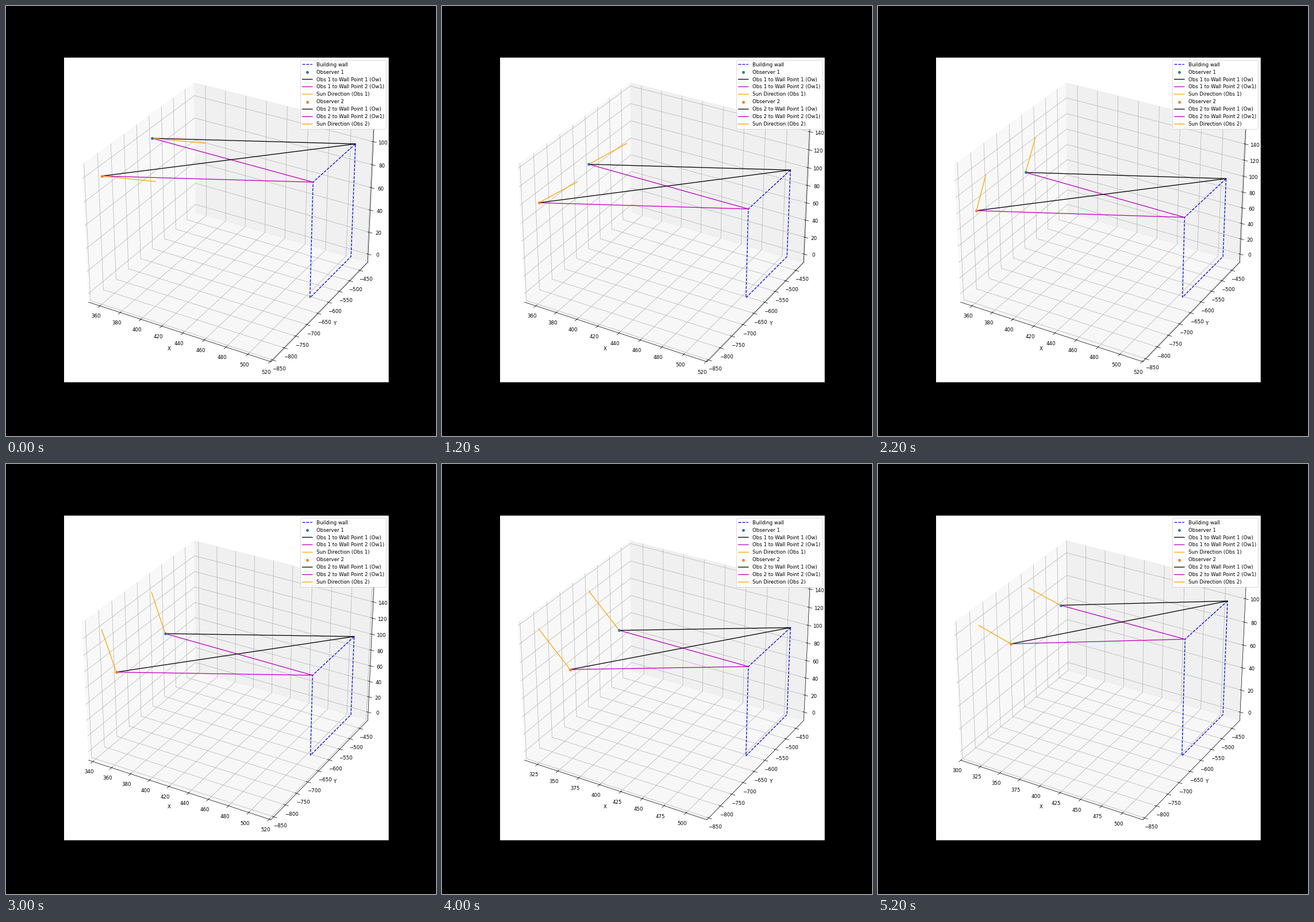
Write a matplotlib script that moves like this. It is 748 px wide and 748 px high and loops after 5.3 s.

```python
import numpy as np
import matplotlib.pyplot as plt
from matplotlib.animation import FuncAnimation
from matplotlib.ticker import MultipleLocator

SIZE_PX, SIZE_IN = 748, 12
FRAMES, INTERVAL = 53, 100

WALL_X, OBSERVER_X = 509.8, 359.8
Y_NEAR, Y_MID, Y_FAR = -829, -634, -439
HEIGHT = 100
OBSERVERS = [(OBSERVER_X, Y_MID, HEIGHT), (OBSERVER_X, Y_NEAR, HEIGHT)]
WALL_TOP = [(WALL_X, Y_FAR, HEIGHT), (WALL_X, Y_MID, HEIGHT)]
WALL_BASE = [(WALL_X, Y_MID, 0), (WALL_X, Y_FAR, 0)]

SUN_LENGTH = 50
LATITUDE, DECLINATION = np.radians([28, 22])
NOON = 25.85                 # step at which the sun is highest
STEP_ANGLE = np.radians(3.75)  # a quarter of an hour


def sun_vector(step):
    """East, north and up parts of the sun direction."""
    hour = (step - NOON) * STEP_ANGLE
    sin_lat, cos_lat = np.sin(LATITUDE), np.cos(LATITUDE)
    sin_dec, cos_dec = np.sin(DECLINATION), np.cos(DECLINATION)
    east = -cos_dec * np.sin(hour)
    north = sin_dec * cos_lat - cos_dec * sin_lat * np.cos(hour)
    up = sin_lat * sin_dec + cos_lat * cos_dec * np.cos(hour)
    return SUN_LENGTH * np.array([east, north, up])


def padded(low, high):
    """Data margin of 5 %, then a view margin of 1/48."""
    for part in (1 / 20, 1 / 48):
        pad = (high - low) * part
        low, high = low - pad, high + pad
    return low, high


def columns(*points):
    return np.array(points, dtype=float).T


fig = plt.figure(figsize=(SIZE_IN, SIZE_IN), dpi=SIZE_PX / SIZE_IN,
                 facecolor="black")
ax = fig.add_axes([0.135, 0.125, 0.755, 0.755], projection="3d")
ax.patch.set_snap(False)
ax.set_xlabel("X")
ax.set_ylabel("Y")
ax.yaxis.set_major_locator(MultipleLocator(50))
ax.zaxis.set_major_locator(MultipleLocator(20))
for axis, grey in ((ax.xaxis, 0.95), (ax.yaxis, 0.89), (ax.zaxis, 0.94)):
    axis.set_pane_color((grey, grey, grey, 0.5))

ax.plot(*columns(*WALL_TOP, *WALL_BASE, WALL_TOP[0]), "b--",
        label="Building wall")

sun_lines = []
for i, obs in enumerate(OBSERVERS, 1):
    ax.scatter(*obs, label=f"Observer {i}")
    for j, (top, color, tag) in enumerate(zip(WALL_TOP, "km", ("Ow", "Ow1")), 1):
        ax.plot(*columns(obs, top), color=color,
                label=f"Obs {i} to Wall Point {j} ({tag})")
    sun_lines += ax.plot(*columns(obs, obs), color="orange",
                         label=f"Sun Direction (Obs {i})")

legend = ax.legend(loc="upper right", labelspacing=0.46)
for handle in legend.legend_handles:
    handle.set_snap(False)


def update(step):
    ends = np.array(OBSERVERS) + sun_vector(step)
    for line, obs, end in zip(sun_lines, OBSERVERS, ends):
        line.set_data_3d(*columns(obs, end))

    points = np.vstack([OBSERVERS, ends, WALL_TOP, WALL_BASE])
    low, high = points.min(axis=0), points.max(axis=0)
    x_span = 1.1 * (high[0] - low[0])
    ax.xaxis.set_major_locator(MultipleLocator(20 if x_span <= 180 else 25))
    ax.set_xlim(*padded(low[0], high[0]))
    ax.set_ylim(*padded(low[1], high[1]))
    ax.set_zlim(*padded(low[2], high[2]))
    return sun_lines


anim = FuncAnimation(fig, update, frames=FRAMES, interval=INTERVAL,
                     repeat=True, repeat_delay=0, blit=False)
plt.show()
```
